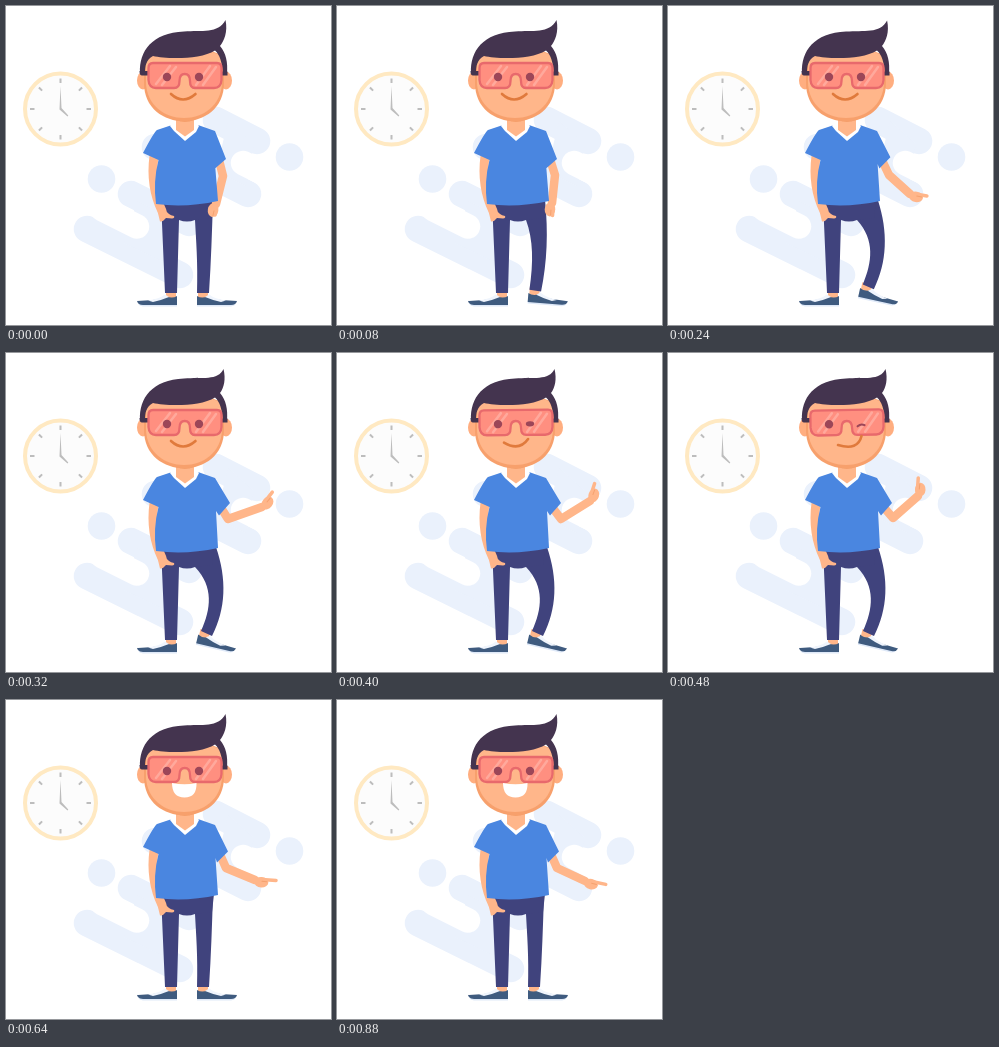
Animation of 325x319 px, one loop 6420 ms. Source, as an HTML page:

```html
<!DOCTYPE html>
<html lang="en">
<head>
<meta charset="utf-8">
<title>Pointing man</title>
<style>
html, body { margin: 0; width: 100%; height: 100%; overflow: hidden; background: #fff; }
svg { display: block; width: 100vw; height: 100vh; }
.line { fill: none; stroke-linecap: round; stroke-linejoin: round; }
.skin { fill: #ffb68a; }
.skinLine { stroke: #ffb68a; }
.hair { fill: #44344f; }
.pants { fill: #40437d; }
.shirt { fill: #4a86e0; }
</style>
</head>
<body>
<svg viewBox="0 0 325 319">
  <defs>
    <g id="shoe">
      <path class="skin" d="M160 284H170V292H160Z"/>
      <path fill="#dfe9f8" d="M132 297H171V300.5H137Q133 300 132 297Z"/>
      <path fill="#3f5b7f" d="M131 295L147 294Q155 293 160 290Q166 293 171 290V299H137Q132 299 131 295Z"/>
      <path fill="#f0f5fd" d="M142 294.6Q153 293 159 288.5L163 291Q156 294 147 296Z"/>
    </g>
  </defs>

  <!-- backdrop -->
  <g class="line" stroke="#eaf1fc" stroke-width="26.5">
    <path d="M81 223L174 269M125 188L183 217M149 141L242 188M210 114L251 135"/>
    <path stroke="none" fill="#eaf1fc" d="M131 195L166 212V260L118 237ZM222 115L248 138L240 180L210 165Z"/>
    <path stroke="#fff" stroke-width="24.5" d="M96 203L131 220.5M237 157L272 174.500"/>
  </g>
  <g fill="#eaf1fc">
    <circle cx="283.500" cy="151" r="13.800"/>
    <circle cx="95.500" cy="173" r="13.800"/>
  </g>

  <!-- clock -->
  <circle cx="54.500" cy="103" r="35.500" fill="#fcfcfc" stroke="#ffe9c2" stroke-width="4"/>
  <g id="ticks" stroke="#bdbdbd" stroke-width="2"></g>
  <path fill="#bdbdbd" d="M54.500 80L53.500 103.500L61.500 110.500L62.300 109.500L55.500 102Z"/>

  <!-- legs -->
  <use href="#shoe"/>
  <g id="foot"><use href="#shoe" transform="matrix(-1 0 0 1 362 0)"/></g>
  <path id="leg" class="pants"/>
  <path class="pants" d="M155 194H208L206 212L189 214Q181 217 173 214L171 287H159Z"/>

  <!-- arms -->
  <path class="line skinLine" stroke-width="9" d="M148 150Q144 180 156 205"/>
  <path class="skin" d="M151 200L159 203Q162 209 168 210Q169 212 166 212.500L160 212Q157 216 154 215.500Q152 209 151 200Z"/>
  <path id="arm" class="line skinLine" stroke-width="8.500"/>
  <g id="hand">
    <path id="finger" class="line skinLine" stroke-width="3.500"/>
    <ellipse class="skin" cx="6.500" cy="1.800" rx="7" ry="5.300"/>
    <path class="line" stroke="#f5a270" stroke-width="1" d="M7 .8L12 1"/>
  </g>

  <!-- torso -->
  <path id="shirt" class="shirt"/>
  <path fill="#fff" d="M167 115L164 120L168 125L179 135L190 126L193 120L189 115Z"/>
  <path class="skin" d="M170 106H188V124L179 130.500L170 124Z"/>
  <path fill="#f59f6b" d="M170 110H188V114Q179 118 170 114Z"/>

  <!-- head -->
  <g fill="#ffae80">
    <ellipse cx="137" cy="74.500" rx="6" ry="9"/>
    <ellipse cx="220" cy="74.500" rx="6" ry="9"/>
  </g>
  <path fill="#f7a06c" d="M138 50V77C138 128 218 128 218 77V50L178 34Z"/>
  <path class="skin" d="M140 50V76C141 124 215 124 216 76V50L178 34Z"/>
  <path id="hair" class="hair"/>
  <path class="hair" d="M133.500 65H143V69.500H136Q133.500 69.500 133.500 65ZM214 65.500H221.500V69.500H214Z"/>
  <g id="glasses">
    <path id="lens" fill="#ff8f80" stroke="#e8696c" stroke-width="2.300" stroke-linejoin="round"
      d="M147 57H211Q215.500 57 215.500 62V74Q215 82 208 82H189Q184 82 184 75Q184 68 178.700 68Q173.500 68 173.500 75Q173.500 82 168 82H150Q143 82 142.500 74V62Q142.500 57 147 57Z"/>
    <path class="line" stroke="#ffa99c" stroke-width="2.500" d="M150 78L164 60M156 79L170 61M190 79L204 60M197 79L210 61"/>
    <circle cx="161" cy="71" r="4.200" fill="#9c4658"/>
    <ellipse id="eye" cx="193" cy="71" rx="4.200" fill="#9c4658"/>
    <path id="wink" class="line" stroke="#9c4658" stroke-width="2" d="M189.500 73.500Q193 70.500 196.500 72.500"/>
  </g>
  <path id="smile" class="line" stroke="#e07a3c" stroke-width="2.600"/>
  <path id="grin" fill="#fff" d="M166 83Q178.500 85.500 190.500 83Q191 97.500 178.500 97.500Q166 97.500 166 83Z"/>
</svg>
<script>
const LOOP = 6420, STEP = 40;
const $ = id => document.getElementById(id);
const set = (id, name, value) => $(id).setAttribute(name, value);

// time, elbow x y, wrist x y, hand angle, finger length, lift, bend, tilt, wink, grin
const keys = [
  [0, 217, 170, 210, 198, 100, 11, 0, 0, 0, 0, 0],
  [160, 219, 168, 220, 196, 84, 14, 0, .7, 0, 0, 0],
  [240, 221, 169, 242, 188, 10, 17, .6, .95, 0, 0, 0],
  [320, 222, 166, 256, 154, -52, 18, 1, 1, 0, 0, 0],
  [400, 224, 166, 253, 148, -72, 18, 1, 1, -.5, .4, 0],
  [480, 225, 165, 250, 143, -86, 18, 1, 1, -1, 1, 0],
  [560, 222, 166, 255, 157, -44, 18, .8, .85, -2, 1, 0],
  [640, 220, 168, 249, 180, 4, 21, .5, 0, 0, 0, 1],
  [680, 220, 168, 248, 181, 12, 21, .5, 0, 0, 0, 1]
];

function poseAt(t) {
  const i = keys.findIndex(k => k[0] > t);
  if (i < 0) return keys.at(-1);
  const a = keys[i - 1], b = keys[i], f = (t - a[0]) / (b[0] - a[0]);
  return a.map((v, n) => v + (b[n] - v) * f);
}

function draw(t) {
  const [, ex, ey, wx, wy, angle, reach, lift, bend, tilt, wink, grin] = poseAt(t);

  set('arm', 'd', `M212 150L${ex} ${ey}L${wx} ${wy}`);
  set('hand', 'transform', `translate(${wx} ${wy}) rotate(${angle})`);
  set('finger', 'd', `M0 0L7 -1L${reach} -1`);

  set('leg', 'd', `M${207 + 3 * bend} 194C${206 + 15 * bend} 226 ${205 + 15 * bend} 256 ${203 + 3 * bend} ${287 - 4 * bend}
    L${191 + 4 * bend} ${287 - 9 * bend}C${192 + 13 * bend} 256 ${190 + 18 * bend} 234 189 214L186 194Z`);
  set('foot', 'transform', `translate(${1.5 * bend} ${-7 * bend}) rotate(${13 * bend} 197 288)`);

  set('shirt', 'd', `M166 119L151 124Q148 126 137 147L152.500 154Q147 175 150 198Q180 202 212 195
    L${209 + lift} 158L${209 + 4 * lift} 162.500L${220 + 4 * lift} ${153 - 3 * lift}L209 125L192 119L179 132Z`);

  const sway = Math.max(0, 2 * lift - 1);
  set('hair', 'd', `M134 67C133 45 146 27 178 25.500C196 24 212 28 ${219.500 - 2 * sway} ${14 + 2 * sway}
    C${222 - 2 * sway} 26 218 35 214 40C220 47 222 56 221 68H217C216 56 214 49 209 44.500
    C194 54 160 53 147 50C140 54 139 60 139 67Z`);

  set('glasses', 'transform', `rotate(${tilt} 179 70)`);
  set('eye', 'ry', 4.2 * (1 - wink));
  set('wink', 'opacity', wink > .7 ? 1 : 0);
  set('smile', 'd', `M${165 + 5 * wink} ${88 + 4 * wink}Q${177 + 13 * wink} ${99 - wink} ${189.5 + 4 * wink} ${88 - 5 * wink}`);
  set('smile', 'opacity', grin > .4 ? 0 : 1);
  set('grin', 'transform', `translate(178.500 90) scale(${grin}) translate(-178.500 -90)`);
}

for (let a = 0; a < 360; a += 45) {
  const tick = document.createElementNS('http://www.w3.org/2000/svg', 'path');
  tick.setAttribute('d', 'M54.500 72.500V77');
  tick.setAttribute('transform', `rotate(${a} 54.500 103)`);
  $('ticks').append(tick);
}

const start = performance.now();
function tick() {
  const t = (performance.now() - start) % LOOP;
  draw(Math.floor(t / STEP) * STEP);
  requestAnimationFrame(tick);
}
tick();
</script>
</body>
</html>
```
